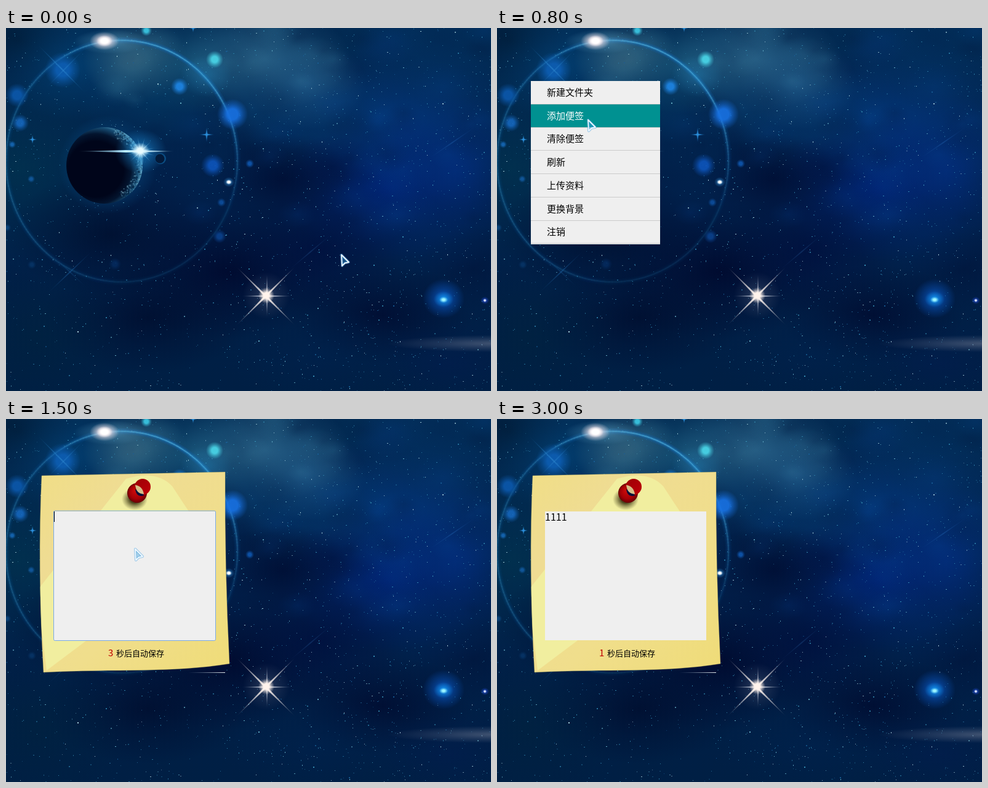
Write an HTML page with a canvas that moves like this. It is 788 by 589 pixels and loops after 3.2 s.

```html
<!DOCTYPE html>
<html lang="zh">
<head>
<meta charset="utf-8">
<title>Desktop sticky note</title>
<style>
html, body { margin: 0; width: 100%; height: 100%; overflow: hidden; background: #001a3c; }
canvas { display: block; width: 788px; height: 589px; }
</style>
</head>
<body>
<canvas id="stage" width="788" height="589"></canvas>
<script>
const W = 788, H = 589, LOOP = 3200, TAU = Math.PI * 2;
const FONT = '"Noto Sans CJK SC", "Noto Sans CJK", "Noto Sans SC", sans-serif';
const ITEMS = ['新建文件夹', '添加便签', '清除便签', '刷新', '上传资料', '更换背景', '注销'];
const ctx = document.getElementById('stage').getContext('2d');

// time, x, y of the pointer tip; each place holds until the next
const POINTER = [
  [0, 543, 366], [100, 51, 86], [400, 57, 90], [500, 67, 97], [600, 92, 112],
  [700, 124, 132], [800, 146, 147], [1300, 168, 168], [1400, 194, 196], [1500, 208, 209]
];

let seed = 71;
function rand() {
  seed = (seed * 1664525 + 1013904223) >>> 0;
  return seed / 4294967296;
}

function layer(paint) {
  const c = document.createElement('canvas');
  c.width = W;
  c.height = H;
  paint(c.getContext('2d'));
  return c;
}

const alphaHex = a => Math.round(a * 255).toString(16).padStart(2, '0');

function glow(g, x, y, rx, ry, color, alpha = 1, core = 0) {
  g.save();
  g.translate(x, y);
  g.scale(1, ry / rx);
  const grad = g.createRadialGradient(0, 0, 0, 0, 0, rx);
  grad.addColorStop(0, color + alphaHex(alpha));
  grad.addColorStop(core, color + alphaHex(alpha));
  grad.addColorStop(core + (1 - core) * 0.5, color + alphaHex(alpha * 0.45));
  grad.addColorStop(1, color + '00');
  g.fillStyle = grad;
  g.fillRect(-rx, -rx, rx * 2, rx * 2);
  g.restore();
}

// Tapered ray, bright in the middle
function ray(g, x, y, len, angle, width, color, alpha) {
  g.save();
  g.translate(x, y);
  g.rotate(angle);
  const grad = g.createLinearGradient(-len, 0, len, 0);
  grad.addColorStop(0, color + '00');
  grad.addColorStop(0.5, color + alphaHex(alpha));
  grad.addColorStop(1, color + '00');
  g.fillStyle = grad;
  g.beginPath();
  g.moveTo(-len, 0);
  g.lineTo(0, -width);
  g.lineTo(len, 0);
  g.lineTo(0, width);
  g.fill();
  g.restore();
}

function disc(g, x, y, r, fill) {
  g.fillStyle = fill;
  g.beginPath();
  g.arc(x, y, r, 0, TAU);
  g.fill();
}

function nebula(g) {
  const base = g.createLinearGradient(0, 0, 0, H);
  base.addColorStop(0, '#022a52');
  base.addColorStop(0.5, '#011f4a');
  base.addColorStop(1, '#001f44');
  g.fillStyle = base;
  g.fillRect(0, 0, W, H);
  const clouds = [
    [20, 230, 200, 170, '#01334f', .8], [20, 20, 100, 80, '#001730', .7],
    [110, 60, 130, 90, '#034a80', .6], [640, 150, 220, 130, '#043a86', .7],
    [620, 260, 170, 120, '#001f78', .75], [730, 230, 130, 120, '#033083', .7],
    [520, 150, 130, 90, '#04396c', .6], [700, 30, 160, 100, '#023060', .7],
    [450, 245, 110, 75, '#000d33', .85], [530, 225, 80, 50, '#00103c', .55],
    [170, 335, 170, 100, '#000d2b', .75], [360, 395, 190, 110, '#00082c', .85],
    [230, 470, 170, 90, '#000c2c', .75], [510, 360, 140, 100, '#000f3e', .75],
    [610, 465, 150, 80, '#000a2e', .75], [760, 390, 100, 70, '#001238', .5],
    [690, 335, 110, 70, '#01275e', .6], [50, 500, 150, 130, '#00223f', .7],
    [510, 530, 160, 80, '#00224f', .5], [720, 545, 140, 70, '#021c50', .5]
  ];
  for (const c of clouds) glow(g, ...c);

  // bright teal haze near the top
  const haze = [
    [210, 52, 85, 70, '#5a92a2', .6], [310, 60, 120, 80, '#1f6688', .65],
    [420, 50, 140, 85, '#38799e', .65], [490, 90, 95, 75, '#2a6b9b', .5],
    [400, 130, 90, 60, '#0c4679', .5], [240, 120, 120, 70, '#04406c', .5]
  ];
  for (const h of haze) glow(g, ...h);
  for (let i = 0; i < 80; i++) {
    const x = 180 + rand() * 608, y = rand() * 320, r = 12 + rand() * 32;
    const light = x < 540 && y < 120;
    glow(g, x, y, r * 1.4, r, rand() < .5 ? '#00163c' : light ? '#3f86a6' : '#07489a', .16);
  }
}

function stars(g) {
  const tints = ['#2d7fa8', '#3c9cc0', '#195f98', '#72bfd4', '#b9e2ea'];
  for (let i = 0; i < 2300; i++) {
    const x = rand() * W, y = rand() * H, k = rand();
    if (x < 320 && rand() < .3) continue;
    g.globalAlpha = .35 + rand() * .55;
    g.fillStyle = tints[Math.floor(k * k * tints.length)];
    g.fillRect(Math.floor(x), Math.floor(y), rand() < .25 ? 2 : 1, rand() < .2 ? 2 : 1);
  }
  g.globalAlpha = 1;
}

function ring(g) {
  const steps = 240;
  for (let i = 0; i < steps; i++) {
    const a = i / steps * TAU;
    const lit = Math.max(0, Math.cos(a + 1.1));
    const left = Math.max(0, -Math.cos(a));
    const power = .1 + .55 * lit ** 2 + .12 * left;
    const arc = (width, color, alpha) => {
      g.strokeStyle = color;
      g.globalAlpha = alpha;
      g.lineWidth = width;
      g.beginPath();
      g.ellipse(188, 216, 188, 196, 0, a, a + TAU / steps + .002);
      g.stroke();
    };
    arc(10, '#1467b4', power * .35);
    arc(5, '#2589d0', power * .6);
    arc(1.6, '#67c9f0', power * .8);
  }
  g.globalAlpha = 1;
  glow(g, 325, 78, 42, 34, '#2f9bd6', .35);
  glow(g, 170, 22, 60, 20, '#6fb8d8', .5);
  glow(g, 160, 21, 24, 15, '#f1dfe6', 1, .25);
  glow(g, 160, 21, 13, 9, '#ffffff', 1, .4);
}

function bokeh(g) {
  const spots = [
    [18, 109, 19, '#0b58ac'], [23, 154, 14, '#1566bc'], [10, 189, 6, '#1567b5'],
    [41, 245, 6, '#11599f'], [92, 68, 29, '#0d5eb4'], [228, 4, 9, '#3bcbe6'],
    [339, 51, 14, '#4ad8ea'], [282, 95, 14, '#1e86e6'], [368, 140, 25, '#1872e4'],
    [336, 223, 19, '#0d55bc'], [396, 220, 7, '#0e56ae'], [350, 283, 7, '#0c4d9c'],
    [347, 338, 11, '#0a418c'], [177, 383, 10, '#04295c'], [42, 384, 7, '#063365'],
    [2, 324, 6, '#0a447c']
  ];
  for (const [x, y, r, color] of spots) glow(g, x, y, r, r, color, .9, .35);
  ray(g, 90, 66, 57, .79, 1.2, '#2a84cc', .6);
  ray(g, 96, 66, 45, -.79, 1, '#2a84cc', .4);
  ray(g, 104, 396, 52, -.76, 1, '#1c5f9c', .5);
  ray(g, 104, 396, 36, .76, 1, '#1c5f9c', .3);
  for (const [x, y, r] of [[326, 173, 13], [43, 181, 8], [304, 0, 8]]) {
    ray(g, x, y, r, 0, 1.6, '#2b90dd', 1);
    ray(g, x, y, r, TAU / 4, 1.6, '#2b90dd', 1);
  }
  glow(g, 362, 250, 9, 8, '#3da4f0', .8);
  glow(g, 362, 250, 5, 4, '#ffffff', 1, .4);
}

function planet(g) {
  glow(g, 165, 222, 80, 80, '#08497f', .7, .5);
  g.save();
  g.beginPath();
  g.arc(160, 223, 62, 0, TAU);
  g.clip();
  const body = g.createRadialGradient(146, 229, 45, 146, 229, 80);
  body.addColorStop(0, '#00051a');
  body.addColorStop(.35, '#03142e');
  body.addColorStop(.65, '#164b72');
  body.addColorStop(.87, '#5ba1c2');
  body.addColorStop(1, '#b5e0ee');
  g.fillStyle = body;
  g.fillRect(90, 155, 140, 140);
  for (let i = 0; i < 240; i++) {
    const a = -1.3 + rand() * 2.4, r = 48 + rand() * 14;
    g.fillStyle = rand() < .6 ? '#04203f99' : '#8fc8de66';
    g.fillRect(160 + r * Math.cos(a), 223 + r * Math.sin(a), 1 + rand() * 2, 1 + rand() * 2);
  }
  g.restore();
  glow(g, 219, 200, 42, 36, '#1b8cd8', .75);
  ray(g, 195, 200, 80, 0, 2, '#a5e4ff', 1);
  ray(g, 218, 200, 56, 0, 2, '#d8f6ff', .9);
  for (let i = 0; i < 6; i++) ray(g, 219, 200, 25, i * .52 + .3, 1.2, '#8ddcff', .8);
  glow(g, 218, 199, 15, 13, '#e8fbff', 1, .3);
  disc(g, 251, 212, 9, '#0b4d83');
  disc(g, 250, 212, 7.5, '#031a3a');
}

function flares(g) {
  glow(g, 423, 434, 38, 38, '#435371', .6);
  ray(g, 422, 435, 68, TAU / 8, 1.7, '#fff4ee', 1);
  ray(g, 422, 435, 68, -TAU / 8, 1.7, '#fff4ee', 1);
  ray(g, 424, 435, 42, 0, 1.4, '#d8dce8', .9);
  ray(g, 424, 434, 36, TAU / 4, 1.4, '#d8dce8', .9);
  glow(g, 423, 434, 13, 13, '#fff3ec', 1, .35);

  glow(g, 711, 439, 34, 32, '#0b63dc', .85);
  glow(g, 711, 440, 16, 13, '#14a0f4', .9);
  glow(g, 711, 441, 7, 5, '#9bf4ff', 1, .3);
  glow(g, 778, 442, 7, 6, '#2450ee', .9);
  glow(g, 778, 442, 3, 3, '#e4ecff', 1, .3);

  glow(g, 800, 512, 180, 14, '#66718a', .65);
  ray(g, 725, 186, 48, -.6, 1, '#16509a', .6);
  ray(g, 495, 363, 48, -.7, 1, '#143a70', .6);
}

const sky = layer(g => {
  for (const paint of [nebula, stars, ring, bokeh, planet, flares]) paint(g);
});

function paper(g) {
  g.beginPath();
  g.moveTo(58, 92);
  g.lineTo(356, 86);
  g.quadraticCurveTo(355, 240, 363, 397);
  g.bezierCurveTo(270, 412, 180, 405, 61, 411);
  g.quadraticCurveTo(51, 240, 58, 92);
}

function pin(g) {
  glow(g, 209, 130, 21, 18, '#2c2706', .85, .35);
  const body = g.createRadialGradient(210, 116, 2, 213, 120, 16);
  body.addColorStop(0, '#c80a0a');
  body.addColorStop(.65, '#a50006');
  body.addColorStop(1, '#670004');
  disc(g, 213, 120, 16, body);
  const head = g.createLinearGradient(212, 98, 232, 122);
  head.addColorStop(0, '#9f0005');
  head.addColorStop(1, '#bd0008');
  disc(g, 222, 110, 13, head);
  g.fillStyle = '#04103a';
  g.beginPath();
  g.moveTo(210, 114);
  g.quadraticCurveTo(212, 128, 224, 124);
  g.lineTo(222, 119);
  g.fill();
  g.fillStyle = '#d6bd88';
  g.beginPath();
  g.moveTo(210, 107);
  g.quadraticCurveTo(222, 109, 224, 122);
  g.quadraticCurveTo(211, 121, 210, 107);
  g.fill();
}

const note = layer(g => {
  g.save();
  paper(g);
  g.clip();
  const base = g.createLinearGradient(58, 92, 363, 397);
  base.addColorStop(0, '#f0de87');
  base.addColorStop(.25, '#efdc93');
  base.addColorStop(.6, '#f0de8c');
  base.addColorStop(1, '#efdc79');
  g.fillStyle = base;
  g.fillRect(50, 80, 320, 335);
  g.fillStyle = '#f1ee9f';
  g.beginPath();
  g.moveTo(195, 97);
  g.quadraticCurveTo(245, 82, 270, 109);
  g.lineTo(297, 150);
  g.lineTo(130, 360);
  g.lineTo(66, 408);
  g.lineTo(50, 279);
  g.fill();
  g.restore();
  paper(g);
  g.strokeStyle = '#cdbb6466';
  g.lineWidth = 1;
  g.stroke();
  const edge = g.createLinearGradient(296, 0, 356, 0);
  edge.addColorStop(0, '#8098b000');
  edge.addColorStop(1, '#e8edf0');
  g.fillStyle = edge;
  g.fillRect(296, 411, 60, 1);
  pin(g);
  g.fillStyle = '#efefef';
  g.fillRect(78, 150, 262, 209);
});

function label(text, x, y, size, color) {
  ctx.font = size + 'px ' + FONT;
  ctx.fillStyle = color;
  ctx.fillText(text, x, y);
}

function drawMenu(active) {
  ctx.fillStyle = '#efefef';
  ctx.fillRect(55, 86, 210, 265);
  ITEMS.forEach((item, i) => {
    const top = Math.round(86 + i * 37.7);
    const end = Math.round(123 + i * 37.7);
    ctx.fillStyle = '#cbcbcb';
    ctx.fillRect(55, end, 210, 1);
    if (i === active) {
      ctx.fillStyle = '#009191';
      ctx.fillRect(55, top, 210, end - top);
    }
    label(item, 81, top + 24, 15, i === active ? '#fff' : '#000');
  });
}

function drawNote(t) {
  ctx.drawImage(note, 0, 0);
  if (t >= 1500 && t < 2800) {
    ctx.strokeStyle = '#79a9e8';
    ctx.lineWidth = 1;
    ctx.beginPath();
    ctx.roundRect(77.5, 149, 263, 210.5, 2);
    ctx.stroke();
  }
  const typed = t < 1900 ? 0 : Math.min(4, Math.floor((t - 1800) / 100));
  label('1'.repeat(typed), 78, 165, 16, '#000');
  if (t >= 1500 && t < 2400) {
    ctx.fillStyle = '#000';
    ctx.fillRect(78 + Math.round(typed * 8.9), 150, 1, 17);
  }
  label(t < 2300 ? '3' : t < 3000 ? '2' : '1', 166, 385, 15, '#c00000');
  label('秒后自动保存', 179, 385, 13, '#000');
}

function drawPointer(x, y) {
  ctx.save();
  ctx.translate(x, y);
  ctx.lineJoin = 'round';
  ctx.beginPath();
  ctx.moveTo(2, 2);
  ctx.lineTo(3, 20);
  ctx.lineTo(7.5, 15.5);
  ctx.lineTo(14, 14);
  ctx.closePath();
  ctx.strokeStyle = '#4fa3e080';
  ctx.lineWidth = 4;
  ctx.stroke();
  ctx.fillStyle = '#3f9fdc66';
  ctx.fill();
  ctx.strokeStyle = '#eef8ff';
  ctx.lineWidth = 1.8;
  ctx.stroke();
  ctx.restore();
}

function draw(t) {
  ctx.drawImage(sky, 0, 0);
  const [, x, y] = POINTER.findLast(p => p[0] <= t);
  if (t >= 900) drawNote(t);
  else if (t >= 100) drawMenu(t < 400 ? -1 : y < 124 ? 0 : 1);
  if (t < 1900) drawPointer(x, y);
}

const start = performance.now();
function tick() {
  draw((performance.now() - start) % LOOP);
  requestAnimationFrame(tick);
}
tick();
</script>
</body>
</html>
```
